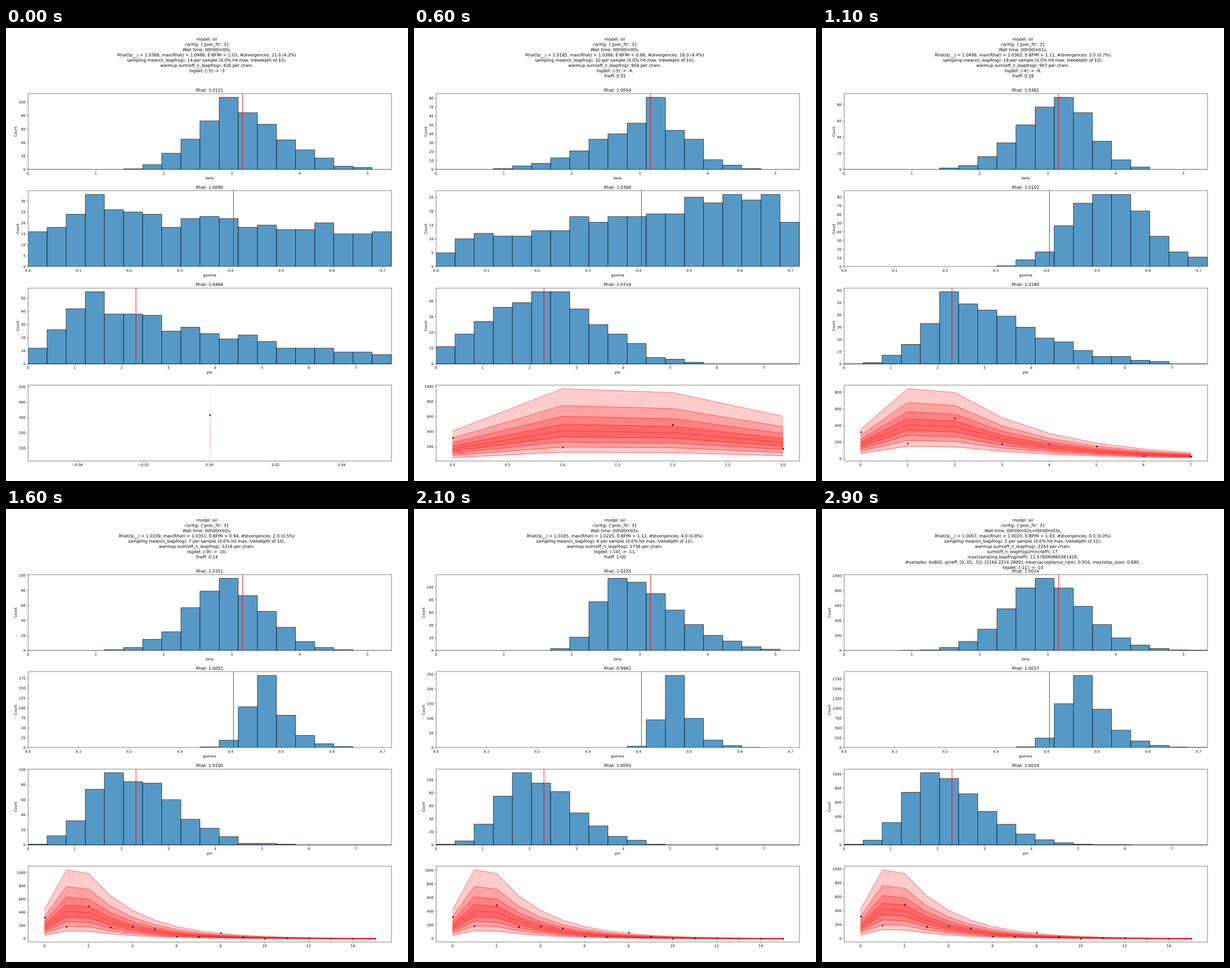
Animation of 706x794 px, one loop 3.1 s. Source, as a matplotlib script:

```python
import matplotlib.pyplot as plt
import numpy as np
from matplotlib.animation import FuncAnimation
from matplotlib.patheffects import Normal

W, H, DPI = 706, 794, 44.125
BINS = 19
# name, upper limit of the axis, reference value
PARAMS = [("beta", 5.348, 3.158), ("gamma", 0.7171, 0.4057), ("phi", 7.756, 2.306)]
OBSERVED = [319, 186, 490, 176, 180, 150, 36, 28, 89, 30, 4, 6, 6, 4, 4, 3]
ONSET = [172, 412, 390]  # median path before it decays
LEFT, WIDTH, HEIGHT, FIRST, STEP = 38.5, 638, 132.9, 248.1, 170.3

plt.rcParams["font.family"] = "DejaVu Sans"
plt.rcParams["text.hinting"] = "none"
fig = plt.figure(figsize=(16, 17.995), dpi=DPI, facecolor="white")
rng = np.random.default_rng(7)
states = []


def panel(row):
    bottom = FIRST + STEP * row
    return fig.add_axes([LEFT / W, 1 - bottom / H, WIDTH / W, HEIGHT / H])


def heading(lines):
    return [fig.text(0.5, 1 - (22.2 + 9.2 * i) / H, line, size=12, ha="center")
            for i, line in enumerate(lines)]


def sample(mode, peak, left, right, level=None, tail=2):
    """Counts of a skewed bell around the bin `mode`, with sampling scatter."""
    d = np.arange(BINS) - mode
    bell = np.where(d < 0, np.exp(-(d / left) ** 2), np.exp(-(abs(d) / right) ** tail))
    counts = (level or peak) * bell
    counts += 0.5 * np.sqrt(counts) * rng.normal(size=BINS)
    counts = np.clip(np.round(counts), 0, peak)
    counts[mode] = peak
    return counts


def histogram(row, counts, rhat):
    name, top, ref = PARAMS[row]
    step = top / BINS
    ax = panel(row)
    ax.bar(np.arange(BINS) * step, counts, step, align="edge", snap=False,
           facecolor=(*plt.cm.tab10(0)[:3], 0.75), edgecolor="black", linewidth=1)
    ax.axvline(ref, color="red", snap=False)
    ax.set(xlim=(0, top), xlabel=name, ylabel="Count", title=f"Rhat: {rhat}")
    return ax


def fan(n, scale, spread, decay=0.42):
    """Nested decile bands around a median that rises, then falls off."""
    x = np.arange(n)
    late = ONSET[-1] * np.exp(-decay * (x - 2))
    median = scale * np.where(x < 2, np.resize(ONSET, n), late)
    p = np.arange(9, 0, -1) / 10
    z = 4.91 * (p ** 0.14 - (1 - p) ** 0.14)  # normal quantiles
    bands = np.outer(np.exp(spread * (z - 0.12 * z ** 2)), median)
    ax = panel(3)
    for low, high in zip(bands[:4], bands[:4:-1]):
        ax.fill_between(x, low, high, color="red", alpha=0.2)
    for line in bands:
        ax.plot(x, line, color="red", alpha=0.5)
    ax.plot(x, OBSERVED[:n], "k.")
    return ax


def summary(wall, lp, worst, bfmi, div, leap, depth, warm):
    return ["model: sir", "config: {'prec_fit': 3}", f"Wall time: {wall},",
            f"Rhat(lp__) = {lp}, max(Rhat) = {worst}, E-BFMI = {bfmi}, #divergences: {div}",
            f"sampling mean(n_leapfrog): {leap} per sample "
            f"(0.0% hit max. treedepth of {depth}),",
            f"warmup sum(eff_n_leapfrog): {warm} per chain,"]


def add_state(lines, rhats, samples, bands):
    artists = heading(lines)
    for row, (counts, rhat) in enumerate(zip(samples, rhats)):
        artists.append(histogram(row, counts, rhat))
    artists.append(bands)
    states.append(artists)


add_state(
    summary("00h00m00s", "1.0368", "1.0468", "1.03", "21.0 (4.2%)", 14, 10, 426)
    + ["logdet: [-3] -> -3"],
    ("1.0121", "1.0090", "1.0468"),
    (sample(10, 107, 2.5, 3.8, level=88),
     sample(3, 33, 5.7, 20, level=25),
     sample(3, 55, 2.6, 8, level=48, tail=1)),
    fan(1, 0.96, 1.0))

add_state(
    summary("00h00m00s", "1.0297", "1.0630", "1.17", "18.0 (7.1%)", 10, 10, 1092)
    + ["logdet: [-3] -> -3,", "fneff: 0.67"],
    ("1.0630", "1.0276", "1.0594"),
    (sample(12, 38, 6, 2.4, level=34),
     sample(17, 18, 35, 1.4, level=10),
     sample(3, 50, 2.4, 2.8, level=46, tail=1)),
    fan(2, 0.9, 1.01))

add_state(
    summary("00h00m00s", "1.0185", "1.0368", "0.86", "16.0 (4.4%)", 10, 10, 904)
    + ["logdet: [-3] -> -4,", "fneff: 0.55"],
    ("1.0054", "1.0368", "1.0314"),
    (sample(11, 81, 4, 2.5, level=60),
     sample(17, 26, 15.5, 1.7, level=24),
     sample(5, 46, 4.3, 4.2)),
    fan(4, 0.99, 0.8))

add_state(
    summary("00h00m01s", "1.0496", "1.0362", "1.11", "3.0 (0.7%)", 19, 10, 907)
    + ["logdet: [-4] -> -9,", "fneff: 0.28"],
    ("1.0362", "1.0102", "1.0180"),
    (sample(11, 89, 3, 2.1),
     sample(13, 83, 2.5, 3.4),
     sample(5, 59, 2.05, 6, level=50)),
    fan(8, 0.99, 0.67, decay=0.48))

add_state(
    summary("00h00m02s", "1.0339", "1.0351", "0.94", "2.0 (0.5%)", 7, 10, 1216)
    + ["logdet: [-9] -> -10,", "fneff: 0.14"],
    ("1.0351", "1.0051", "1.0100"),
    (sample(10, 96, 2.8, 2.8, level=90),
     sample(12, 182, 1.32, 1.2, tail=1.2),
     sample(4, 96, 2, 4)),
    fan(16, 1.01, 0.85))

add_state(
    summary("00h00m02s", "1.0165", "1.0225", "1.12", "4.0 (0.8%)", 6, 12, 1736)
    + ["logdet: [-10] -> -11,", "fneff: 1.00"],
    ("1.0225", "0.9962", "1.0093"),
    (sample(9, 114, 1.5, 4),
     sample(12, 246, 1.02, 1.1, tail=1.3),
     sample(4, 111, 1.85, 3.6, level=100)),
    fan(16, 0.985, 0.84))

add_state(
    summary("00h00m02s+00h00m03s", "1.0007", "1.0020", "1.03", "0.0 (0.0%)", 5, 12, 2243)
    + ["sum(eff_n_leapfrog)/min(neff): 17,",
       "max(sampling leapfrog/neff): 11.578040860381428,",
       "#samples: 6x800, q(neff, [0,.05, .5]): [2164 2214 2809], "
       "mean(acceptance_rate): 0.916, max(step_size): 0.680,",
       "logdet: [-11] -> -10"],
    ("1.0014", "1.0017", "1.0014"),
    (sample(10, 965, 2.75, 2.95, tail=1.8),
     sample(12, 1838, 1.43, 1.45, tail=1.2),
     sample(4, 1020, 1.84, 3.5, tail=1.8)),
    fan(16, 1.02, 0.79))

# Text drawn as outlines keeps its place between whole pixels.
for text in fig.findobj(plt.Text):
    text.set_path_effects([Normal()])


def update(frame):
    current = (frame + 4) // 5
    for i, artists in enumerate(states):
        for artist in artists:
            artist.set_visible(i == current)
    return states[current]


anim = FuncAnimation(fig, update, frames=31, interval=100, init_func=lambda: update(0),
                     repeat=True, repeat_delay=0, blit=False)
plt.show()
```
